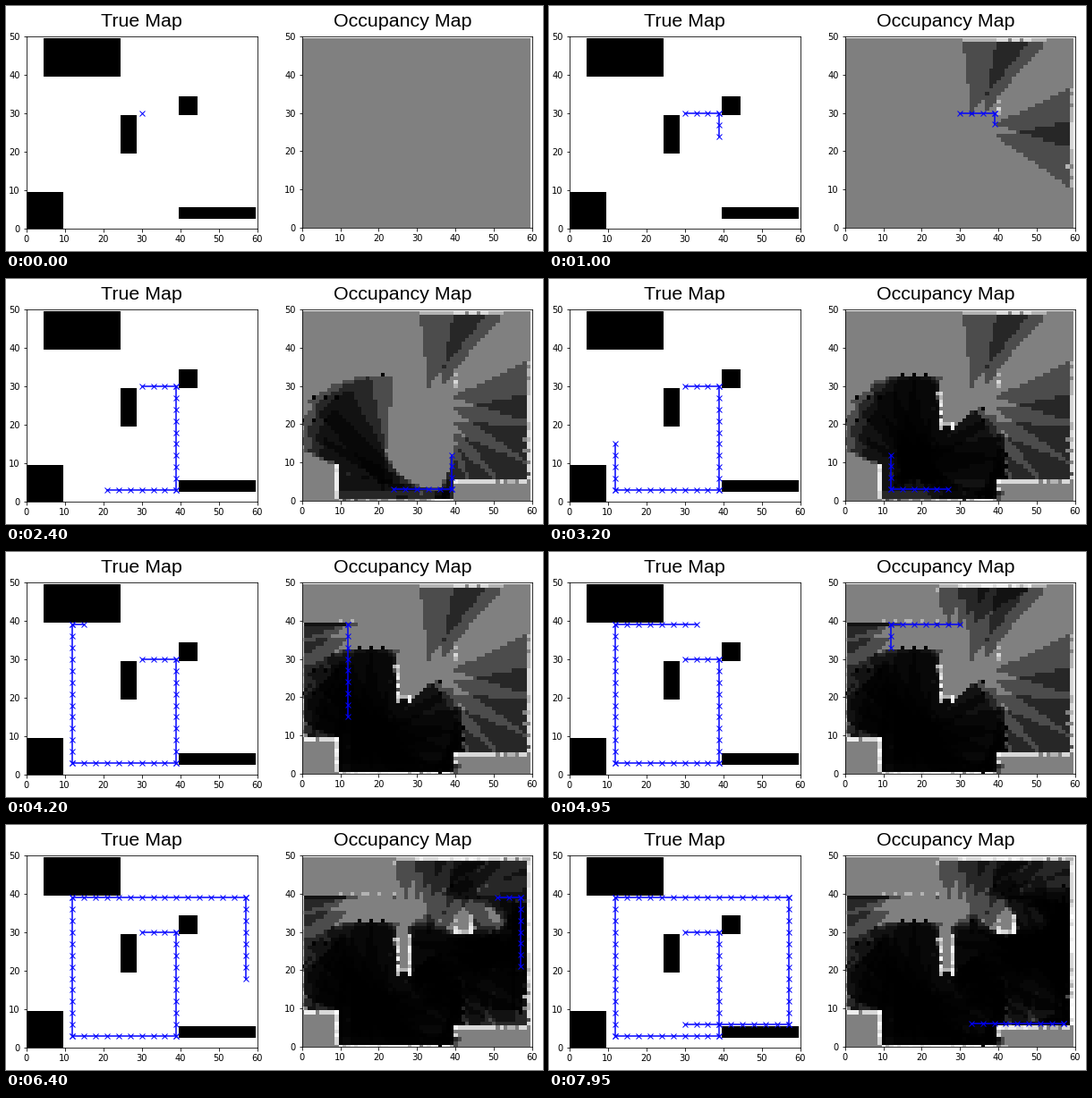
A matplotlib script for the animation above (8 s loop, 600 by 274 pixels).

```python
import numpy as np
import matplotlib.pyplot as plt
from matplotlib.animation import FuncAnimation

W, H, DPI = 600, 274, 100
PX = 72 / DPI                      # points per pixel
INTERVAL, FRAMES = 50, 160

ROWS, COLS = 50, 60
RMAX, ALPHA, BETA = 30, 1.0, 0.05  # sensor range, wall depth, beam width
BEAMS = np.arange(-0.4, 0.4, BETA)
SPIN = 0.3                         # sensor rotation per step
MOVES = [(3, 0), (0, 3), (-3, 0), (0, -3)]
STEPS = 75

# Playback clock: time in ms against simulation step, with two short stalls.
CLOCK_MS = [0, 199, 200, 350, 650, 950, 1000, 1600, 1750, 1800,
            4200, 5200, 5500, 5600, 6400, 7900, 8000]
CLOCK_STEP = [0, 0, 1, 2, 4, 4, 6, 12, 12, 14,
              38, 47, 50, 51, 60, 74, 74]


def build_world():
    world = np.zeros((ROWS, COLS))
    for r0, r1, c0, c1 in [(0, 10, 0, 10), (30, 35, 40, 45), (3, 6, 40, 60),
                           (20, 30, 25, 29), (40, 50, 5, 25)]:
        world[r0:r1, c0:c1] = 1
    return world


def drive(world):
    """Go straight until blocked, then spend one step turning right."""
    row, col, heading = 30, 30, 1
    path = [(row, col)]
    for _ in range(STEPS - 1):
        r, c = row + MOVES[heading][0], col + MOVES[heading][1]
        if not (0 < r < ROWS - 1 and 0 < c < COLS - 1) or world[r, c]:
            heading = (heading + 1) % 4
        else:
            row, col = r, c
        path.append((row, col))
    return np.array(path)


def measure(world, row, col, theta):
    ranges = np.full(len(BEAMS), float(RMAX))
    for k, angle in enumerate(theta + BEAMS):
        for r in range(1, RMAX + 1):
            i = round(row + r * np.cos(angle))
            j = round(col + r * np.sin(angle))
            inside = 0 < i < ROWS - 1 and 0 < j < COLS - 1
            if not inside or world[i, j]:
                ranges[k] = r
                break
    return ranges


def inverse_model(row, col, theta, ranges):
    i, j = np.mgrid[:ROWS, :COLS]
    dist = np.hypot(i - row, j - col)
    phi = (np.arctan2(j - col, i - row) - theta + np.pi) % (2 * np.pi) - np.pi
    gap = np.abs(phi[..., None] - BEAMS)
    hit = ranges[gap.argmin(axis=2)]
    unseen = (dist > np.minimum(RMAX, hit + ALPHA / 2)) | (gap.min(axis=2) > BETA / 2)
    wall = (hit < RMAX) & (np.abs(dist - hit) < ALPHA / 2)
    # Cells exactly at full range match no case and become certainly free.
    return np.select([unseen, wall, dist < hit], [0.5, 0.7, 0.3], 0.0)


def build_beliefs(world, path):
    log_odds, theta = np.zeros((ROWS, COLS)), 0.0
    beliefs = [np.full((ROWS, COLS), 0.5)]
    for row, col in path[1:]:
        theta = (theta + SPIN) % (2 * np.pi)
        p = inverse_model(row, col, theta, measure(world, row, col, theta))
        with np.errstate(divide="ignore"):
            log_odds = log_odds + np.log(p / (1 - p))
        odds = np.exp(log_odds)
        beliefs.append(odds / (1 + odds))
    return beliefs


def add_map(x0, y0, x1, y1, title, title_x, data):
    ax = fig.add_axes([x0 / W, 1 - y1 / H, (x1 - x0) / W, (y1 - y0) / H])
    image = ax.imshow(data, cmap="gray", vmin=0, vmax=1, origin="lower",
                      aspect="auto", interpolation="nearest")
    trail, = ax.plot([], [], "bx-", lw=1.5 * PX, ms=6 * PX, mew=1.0 * PX)
    ax.set(xlim=(0, COLS), ylim=(0, ROWS),
           xticks=range(0, COLS + 1, 10), yticks=range(0, ROWS + 1, 10))
    ax.tick_params(labelsize=9.87 * PX, length=3.5 * PX, width=0.8 * PX,
                   pad=3.5 * PX)
    for spine in ax.spines.values():
        spine.set_linewidth(0.8 * PX)
    fig.text(title_x / W, 1 - 23 / H, title, family="Liberation Sans",
             size=21.4 * PX, ha="center", va="baseline")
    return image, trail


world = build_world()
path = drive(world)
beliefs = build_beliefs(world, path)

plt.rcParams["font.family"] = "DejaVu Sans"
fig = plt.figure(figsize=(W / DPI, H / DPI), dpi=DPI, facecolor="white")
_, true_trail = add_map(22.6, 34.1, 280.6, 248.9, "True Map", 151.5, 1 - world)
belief_image, recent_trail = add_map(330.8, 34.1, 587.5, 247.9,
                                     "Occupancy Map", 443, beliefs[0])


def update(frame):
    step = int(np.interp(frame * INTERVAL, CLOCK_MS, CLOCK_STEP) + 1e-6)
    past = path[:step + 1]
    recent = path[max(0, step - 10):step]
    true_trail.set_data(past[:, 1], past[:, 0])
    recent_trail.set_data(recent[:, 1], recent[:, 0])
    belief_image.set_data(beliefs[step])
    return true_trail, recent_trail, belief_image


anim = FuncAnimation(fig, update, frames=FRAMES, interval=INTERVAL,
                     repeat=True, repeat_delay=0)
plt.show()
```
